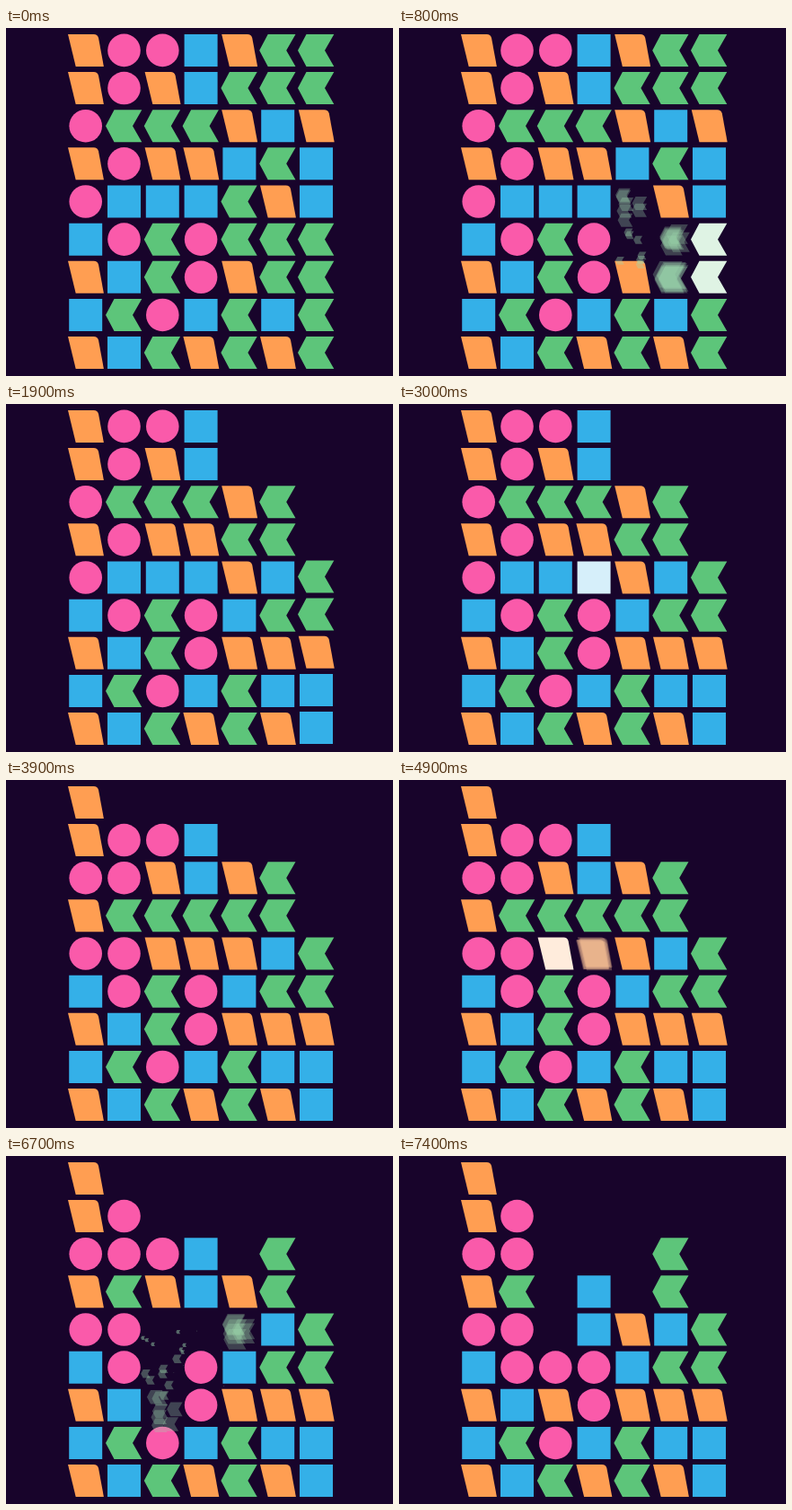
Recreate the animation shown at these times as an HTML page with a canvas. Size 431 px wide and 388 px high, loop 8 s.

```html
<!DOCTYPE html>
<html>
<head>
<meta charset="utf-8">
<style>
html, body { margin: 0; width: 100%; height: 100%; overflow: hidden; background: #18042b; }
canvas { display: block; }
</style>
</head>
<body>
<canvas id="stage" width="431" height="388"></canvas>
<script>
const ctx = document.getElementById('stage').getContext('2d');

const LOOP = 8000, TICK = 100;
// seconds: delay between pieces, flash, shard life, fall time per row
const STAGGER = 0.1, FLASH = 0.15, LIFE = 0.6, ROW_TIME = 0.2;

// A slanted block, P disc, B square, G chevron
const rows = ['APPBAGG', 'APABGGG', 'PGGGABA', 'APAABGB', 'PBBBGAB',
              'BPGPGGG', 'ABGPAGG', 'BGPBGBG', 'ABGAGAG'];

// at: first visible ms, lead: seconds already elapsed, hits: column and row in order
const clicks = [
  { at: 500,  lead: 0.23, hits: ['45', '44', '55', '56', '65', '66', '67', '68'] },
  { at: 3000, lead: 0.07, hits: ['34', '24', '14'] },
  { at: 4900, lead: 0.19, hits: ['34', '24', '44'] },
  { at: 6200, lead: 0.22, hits: ['34', '24', '25', '26', '44'] }
];

const colors = { A: [255, 158, 82], P: [250, 90, 170], B: [52, 176, 232], G: [93, 197, 122] };

const paths = {
  A: new Path2D('M-19.7-18H9Q13.2-18 14.3-14L20.2 18H-11Z'),
  P: new Path2D('M-18.3 0A18.3 18.3 0 1 1 18.3 0A18.3 18.3 0 1 1-18.3 0Z'),
  B: new Path2D('M-18.5-18H18.5V18H-18.5Z'),
  G: new Path2D('M-20.5 0L-11-18H19.8L9.5 0L19.8 18H-11Z')
};

const colX = c => 88.7 + 42.8 * c;
const rowY = r => 24.9 + 42.15 * r;
const noise = n => { const v = Math.sin(n * 127.1) * 43758.5453; return v - Math.floor(v); };

function bounce(p) {
  if (p <= 0) return 0;
  if (p >= 1) return 1;
  const k = 7.5625, d = 2.75;
  if (p < 1 / d) return k * p * p;
  if (p < 2 / d) return k * (p - 1.5 / d) ** 2 + 0.75;
  if (p < 2.5 / d) return k * (p - 2.25 / d) ** 2 + 0.9375;
  return k * (p - 2.625 / d) ** 2 + 0.984375;
}

function shape(kind, x, y, white = 0, alpha = 1, scale = 1) {
  const rgb = colors[kind].map(v => Math.round(v + (255 - v) * white));
  ctx.save();
  ctx.translate(x, y);
  ctx.scale(scale, scale);
  ctx.globalAlpha = alpha;
  ctx.fillStyle = `rgb(${rgb})`;
  ctx.fill(paths[kind]);
  ctx.restore();
}

function shards(cell, age) {
  const q = age / LIFE;
  if (q >= 1) return;
  for (let i = 0; i < 7; i++) {
    const seed = cell.c * 31 + cell.r * 57 + i * 7.3;
    const vx = (noise(seed) - 0.5) * 110;
    const vy = (noise(seed + 0.5) - 0.5) * 120;
    shape(cell.kind, colX(cell.c) + vx * age, rowY(cell.r) + vy * age + 90 * age * age,
          0.4, 0.28 + 0.5 * q ** 4, (1 - q) ** 1.4);
  }
}

function draw(t) {
  ctx.fillStyle = '#18042b';
  ctx.fillRect(0, 0, 431, 388);
  let board = rows.flatMap((row, r) => [...row].map((kind, c) => ({ kind, c, r })));
  const bursts = [];

  for (const { at, lead, hits } of clicks) {
    if (t < at) break;
    const dt = (t - at) / 1000 + lead;
    const fallAt = STAGGER * hits.length + 0.25;
    const next = [];
    for (const cell of board) {
      const i = hits.indexOf(`${cell.c}${cell.r}`);
      if (i >= 0) {
        const age = dt - STAGGER * i;
        if (age >= FLASH) bursts.push([cell, age - FLASH]);
        else next.push({ ...cell, white: age >= 0 ? 0.8 : 0 });
        continue;
      }
      const drop = hits.filter(h => +h[0] === cell.c && +h[1] > cell.r).length;
      const fall = drop && drop * bounce((dt - fallAt) / (ROW_TIME * drop));
      next.push({ ...cell, r: cell.r + fall });
    }
    board = next;
  }

  for (const { kind, c, r, white } of board) shape(kind, colX(c), rowY(r), white);
  for (const [cell, age] of bursts) shards(cell, age);
}

const start = performance.now();
function frame() {
  const t = (performance.now() - start) % LOOP;
  draw(Math.floor(t / TICK) * TICK);
  requestAnimationFrame(frame);
}
frame();
</script>
</body>
</html>
```
